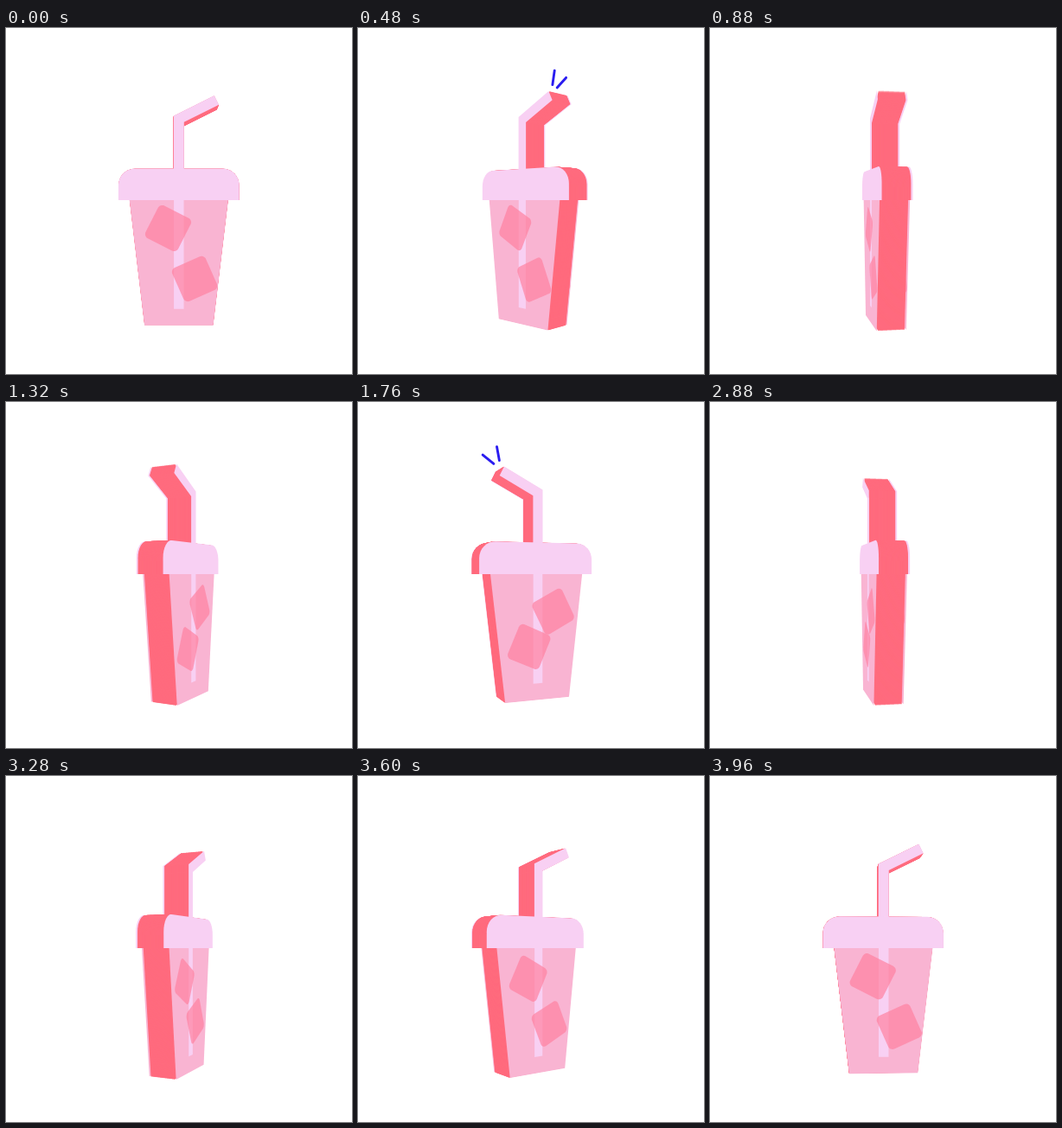
These frames come from a looping animation (400x400 px, 4 s). An HTML page with a canvas:

```html
<!DOCTYPE html>
<html lang="en">
<head>
<meta charset="utf-8">
<title>Spinning drink</title>
<style>
  html, body { margin: 0; width: 100%; height: 100%; overflow: hidden; background: #fff; }
  canvas { display: block; width: 100vmin; height: 100vmin; }
</style>
</head>
<body>
<canvas id="stage" width="400" height="400"></canvas>
<script>
const ctx = document.getElementById('stage').getContext('2d');
const LOOP = 4000, STEP = 40, ICE_DELAY = 250;
const EYE = 600, FOCAL = 584, AXIS = 200.5, HORIZON = 200, OFFSET = -0.7;
const FRONT = 15, BACK = -18.5, RIM = 2, SHEET_GAP = 0.5;
const PINK = '#f8d0f3', CUP = '#f9b4d2', RED = '#ff6b7e', ICE = 'rgba(255,130,161,.7)', BLUE = '#2a1cf0';

// x is measured from the middle of the drink, y from the top of the stage.
const polar = (x, y, radius, degrees) => {
  const a = degrees * Math.PI / 180;
  return [x + radius * Math.cos(a), y + radius * Math.sin(a)];
};
const mix = (a, b, k) => a.map((v, i) => v + (b[i] - v) * k);

function trapezoid(top, bottom, halfTop, halfBottom) {
  return [[-halfTop, top], [halfTop, top], [halfBottom, bottom], [-halfBottom, bottom]];
}

// Replaces each corner that has a radius with a short curve.
function rounded(points, radii) {
  const count = points.length;
  return points.flatMap((corner, i) => {
    const radius = radii[i % radii.length];
    if (!radius) return [corner];
    const [a, b] = [points[(i + count - 1) % count], points[(i + 1) % count]].map(p =>
      mix(corner, p, radius / Math.hypot(p[0] - corner[0], p[1] - corner[1])));
    return Array.from({ length: 9 }, (_, j) => {
      const u = j / 8 * Math.PI / 2;
      return corner.map((v, n) => v + (a[n] - v) * (1 - Math.sin(u)) + (b[n] - v) * (1 - Math.cos(u)));
    });
  });
}

// Outlines a centre line with mitred joints.
function band(line, width) {
  const normals = line.slice(1).map(([x, y], i) => {
    const dx = x - line[i][0], dy = y - line[i][1], length = Math.hypot(dx, dy);
    return [dy / length, -dx / length];
  });
  const side = sign => line.map(([x, y], i) => {
    const a = normals[Math.max(i - 1, 0)], b = normals[Math.min(i, normals.length - 1)];
    const k = sign * width / 2 / (1 + a[0] * b[0] + a[1] * b[1]);
    return [x + (a[0] + b[0]) * k, y + (a[1] + b[1]) * k];
  });
  return [...side(1), ...side(-1).reverse()];
}

function iceCube(x, y, tilt) {
  const corners = [45, 135, 225, 315].map(a => polar(x, y, 30, a + tilt));
  return rounded(corners, [5.5]);
}

const cup = trapezoid(198, 344, 57.3, 39.8);
const lid = rounded(trapezoid(162.5, 199, 70, 70), [19, 19, 0, 0]);
const straw = band([[0, 165], [0, 105], [43.7, 83.2]], 12);
const innerStraw = band([[0, 198], [0, 325]], 11.5);
const sparks = [-79, -35].map(a => [10.5, 26].map(r => polar(44.7, 82, r, a)));

function draw(t) {
  const angle = 2 * Math.PI * t / LOOP, cos = Math.cos(angle), sin = Math.sin(angle);
  const drift = (1 - Math.cos(2 * Math.PI * (t - ICE_DELAY) / LOOP)) / 2;
  const cubes = [
    iceCube(-12 - 9 * drift, 231 + 13.5 * drift, 27),
    iceCube(18.7 - 9.5 * drift, 290.5 - 9.5 * drift, -24)
  ];
  const sparkling = [120, 1720].some(start => t >= start && t <= start + 400);

  function trace(points, z) {
    ctx.beginPath();
    for (const [px, y] of points) {
      const x = px + OFFSET, scale = FOCAL / (EYE - x * sin - z * cos);
      ctx.lineTo(AXIS + (x * cos - z * sin) * scale, HORIZON + (y - HORIZON) * scale);
    }
  }
  function fill(points, z, color) {
    trace(points, z);
    ctx.fillStyle = color;
    ctx.fill();
  }
  function drawFace(z) {
    fill(cup, z, CUP);
    fill(innerStraw, z, PINK);
    for (const cube of cubes) fill(cube, z, ICE);
    fill(straw, z, PINK);
    fill(lid, z, PINK);
    if (!sparkling || z * cos < 0) return;
    ctx.strokeStyle = BLUE;
    ctx.lineWidth = 2.9;
    ctx.lineCap = 'round';
    for (const line of sparks) {
      trace(line, z);
      ctx.stroke();
    }
  }

  ctx.fillStyle = '#fff';
  ctx.fillRect(0, 0, 400, 400);

  // Paint the stacked sheets from the farthest to the nearest.
  const sheets = [FRONT, BACK], eyeZ = EYE * cos;
  for (let z = BACK + RIM; z <= FRONT - RIM; z += SHEET_GAP) sheets.push(z);
  sheets.sort((a, b) => Math.abs(b - eyeZ) - Math.abs(a - eyeZ));
  for (const z of sheets) {
    if (z === FRONT || z === BACK) drawFace(z);
    else for (const part of [cup, straw, lid]) fill(part, z, RED);
  }
}

function tick(now) {
  draw(Math.floor(now % LOOP / STEP) * STEP);
  requestAnimationFrame(tick);
}
requestAnimationFrame(tick);
</script>
</body>
</html>
```
